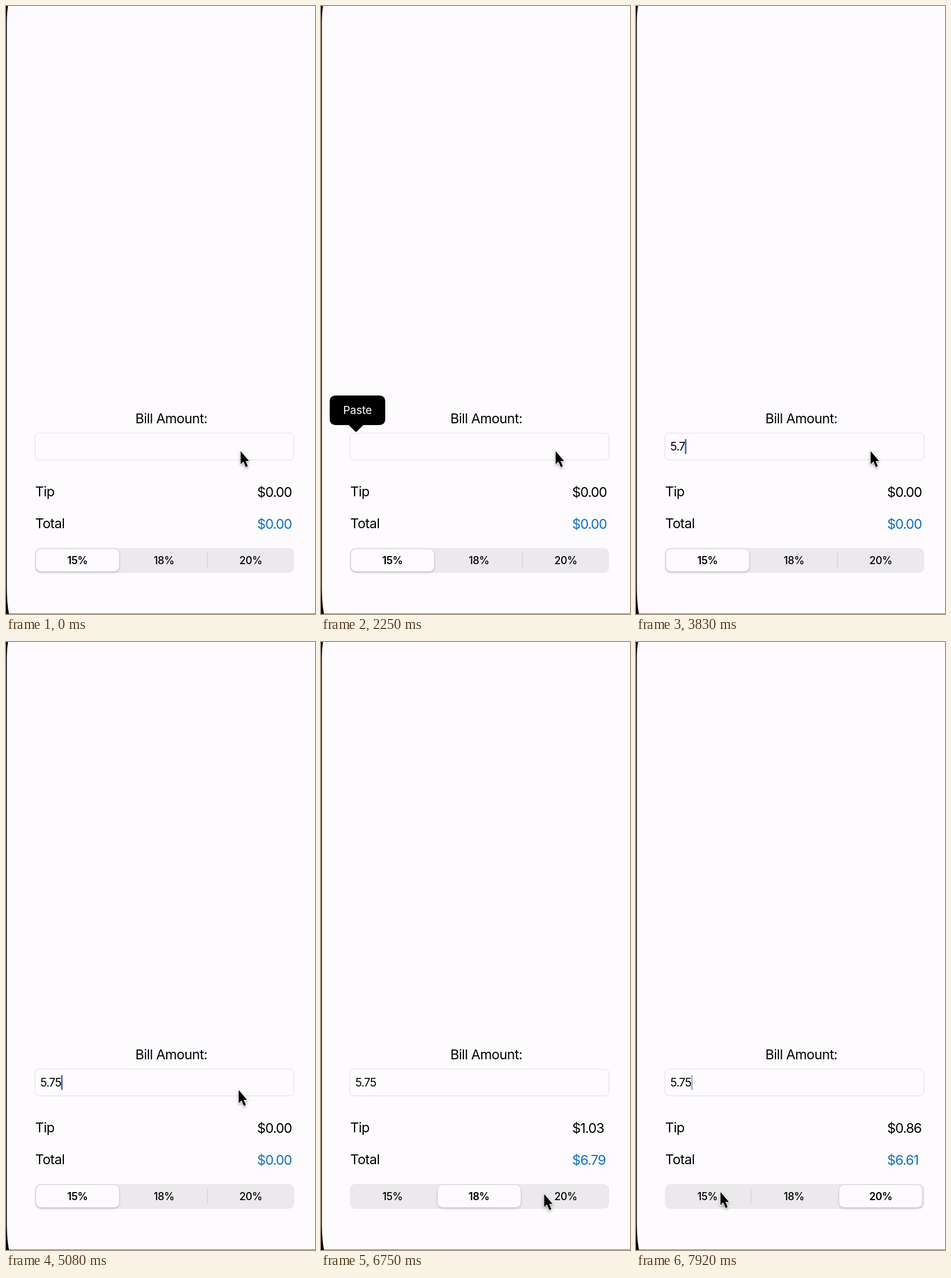
These frames come from a looping animation (534 by 1049 pixels, 8 s). An HTML page:

```html
<!DOCTYPE html>
<html lang="en">
<head>
<meta charset="utf-8">
<title>Tip calculator</title>
<style>
  html, body { margin: 0; width: 100%; height: 100%; overflow: hidden; background: #000; }
  svg { display: block; width: 534px; height: 1049px; }
  text { font-family: Inter, "Liberation Sans", sans-serif; white-space: pre; }
  .label { font-size: 23.3px; letter-spacing: -0.55px; }
  .money { font-size: 23.3px; letter-spacing: -0.95px; }
  .entry { font-size: 19.6px; letter-spacing: -0.75px; }
  .paste { font-size: 19px; fill: #fff; text-anchor: middle; }
  .seg { font-size: 18px; font-weight: 500; letter-spacing: -0.4px; text-anchor: middle; }
  .seg.on { font-weight: 600; }
  #pill { filter: drop-shadow(0 0 1px rgba(0, 0, 0, .15)) drop-shadow(0 2px 2px rgba(0, 0, 0, .16)); }
  #mouse { filter: drop-shadow(0 2px 2px rgba(0, 0, 0, .35)); }
</style>
</head>
<body>
<svg viewBox="0 0 534 1049">
  <path fill="#fdfbfe" d="M3.5 0Q1.4 12 1.4 30V1000Q1.4 1030 5 1048H534V0Z"/>
  <path fill="#77767a" d="M5 1048H534V1049H5Z"/>

  <text class="label" x="223.5" y="720">Bill Amount:</text>
  <rect x="50" y="737" width="447.5" height="46" rx="6.5" fill="#fdfbfe" stroke="#dfdde1"/>
  <text class="entry" id="entry" x="59.3" y="767"></text>
  <rect id="caret" y="747" width="2.6" height="26" rx="1.2" fill="#3464c4"/>

  <text class="label" x="50.5" y="846">Tip</text>
  <text class="money" id="tip" x="434" y="847"></text>
  <text class="label" x="50.5" y="901">Total</text>
  <text class="money" id="total" x="434" y="902" fill="#0b6fd0"></text>

  <rect x="50" y="935" width="448" height="43" rx="9.5" fill="#ebe9ec"/>
  <rect class="bar" x="198" y="944" width="1.2" height="25" fill="#cfcdd1"/>
  <rect class="bar" x="347.4" y="944" width="1.2" height="25" fill="#cfcdd1"/>
  <rect id="pill" y="937" width="143.5" height="38.5" rx="8.5" fill="#fdfbfe"/>
  <text class="seg" x="123.5" y="963">15%</text>
  <text class="seg" x="273" y="963">18%</text>
  <text class="seg" x="423" y="963">20%</text>

  <g id="popup">
    <path d="M26 672H100Q111 672 111 683V712Q111 723 100 723H73L62 734Q60.5 735.5 59 734L48 723H26Q15 723 15 712V683Q15 672 26 672Z"/>
    <text class="paste" x="63.2" y="704">Paste</text>
  </g>

  <path id="mouse" d="M0 0V22.5L4.9 18L8.9 27.5L12.4 26L8.6 17H14.5Z" stroke="#fff" stroke-width="1.7" paint-order="stroke"/>
</svg>
<script>
const LOOP = 8000, STEP = 1000 / 12;
const BILL = '5.75', RATES = [0.15, 0.18, 0.20];
const FIRST_KEY = 2800, KEY_GAP = 385;

const $ = id => document.getElementById(id);
const segs = [...document.querySelectorAll('.seg')];
const bars = [...document.querySelectorAll('.bar')];

const home = { x: 405.5, y: 768 };
const moves = [
  { from: 5000, to: 5833, x: 286, y: 950 },
  { from: 6500, to: 6917, x: 440, y: 954 },
  { from: 7333, to: 7833, x: 146, y: 949 }
];
const clicks = [{ at: 6000, seg: 1 }, { at: 6915, seg: 2 }, { at: 7915, seg: 0 }];

const clamp = v => Math.max(0, Math.min(1, v));
const ramp = (t, from, to) => clamp((t - from) / (to - from));
const smooth = p => p * p * (3 - 2 * p);
const mix = (a, b, p) => a + (b - a) * p;
const dollars = v => '$' + v.toFixed(2);

function mouseAt(t) {
  return moves.reduce((pos, m) => {
    const p = smooth(ramp(t, m.from, m.to));
    return { x: mix(pos.x, m.x, p), y: mix(pos.y, m.y, p) };
  }, home);
}

function pillAt(t) {
  return clicks.reduce((pos, c) => mix(pos, c.seg, smooth(ramp(t, c.at, c.at + 333))), 0);
}

// One-second blink: fade in, hold, fade out. Typing keeps the caret lit.
function caretAlpha(t) {
  const typing = t >= FIRST_KEY && t < FIRST_KEY + 4 * KEY_GAP;
  if (typing) return 1;
  const start = t < FIRST_KEY ? 450 : 833;
  if (t < start) return 0;
  const phase = (t - start) % 1000;
  return ramp(phase, 0, 167) - ramp(phase, 417, 583);
}

function draw(t) {
  const { x, y } = mouseAt(t);
  $('mouse').setAttribute('transform', `translate(${x} ${y})`);
  $('popup').setAttribute('opacity', ramp(t, 833, 1167) - ramp(t, 2667, 2917));

  const keys = Math.max(0, Math.floor((t - FIRST_KEY) / KEY_GAP) + 1);
  $('entry').textContent = BILL.slice(0, keys);
  const end = keys ? $('entry').getComputedTextLength() : 0;
  $('caret').setAttribute('x', 59.2 + end);
  $('caret').setAttribute('opacity', caretAlpha(t));

  const click = clicks.filter(c => c.at <= t).pop();
  const bill = click ? Number(BILL) : 0;
  const tip = click ? bill * RATES[click.seg] : 0;
  $('tip').textContent = dollars(tip);
  $('total').textContent = dollars(bill + tip);

  const pos = pillAt(t);
  $('pill').setAttribute('x', 52 + 149.6 * pos);
  segs.forEach((s, i) => s.classList.toggle('on', Math.round(pos) === i));
  bars[0].setAttribute('opacity', clamp(pos - 1));
  bars[1].setAttribute('opacity', clamp(1 - pos));
}

// The picture advances twelve times a second.
function tick() {
  const t = performance.now() % LOOP;
  draw(Math.floor((t + 5) / STEP) * STEP % LOOP);
  requestAnimationFrame(tick);
}
tick();
</script>
</body>
</html>
```
